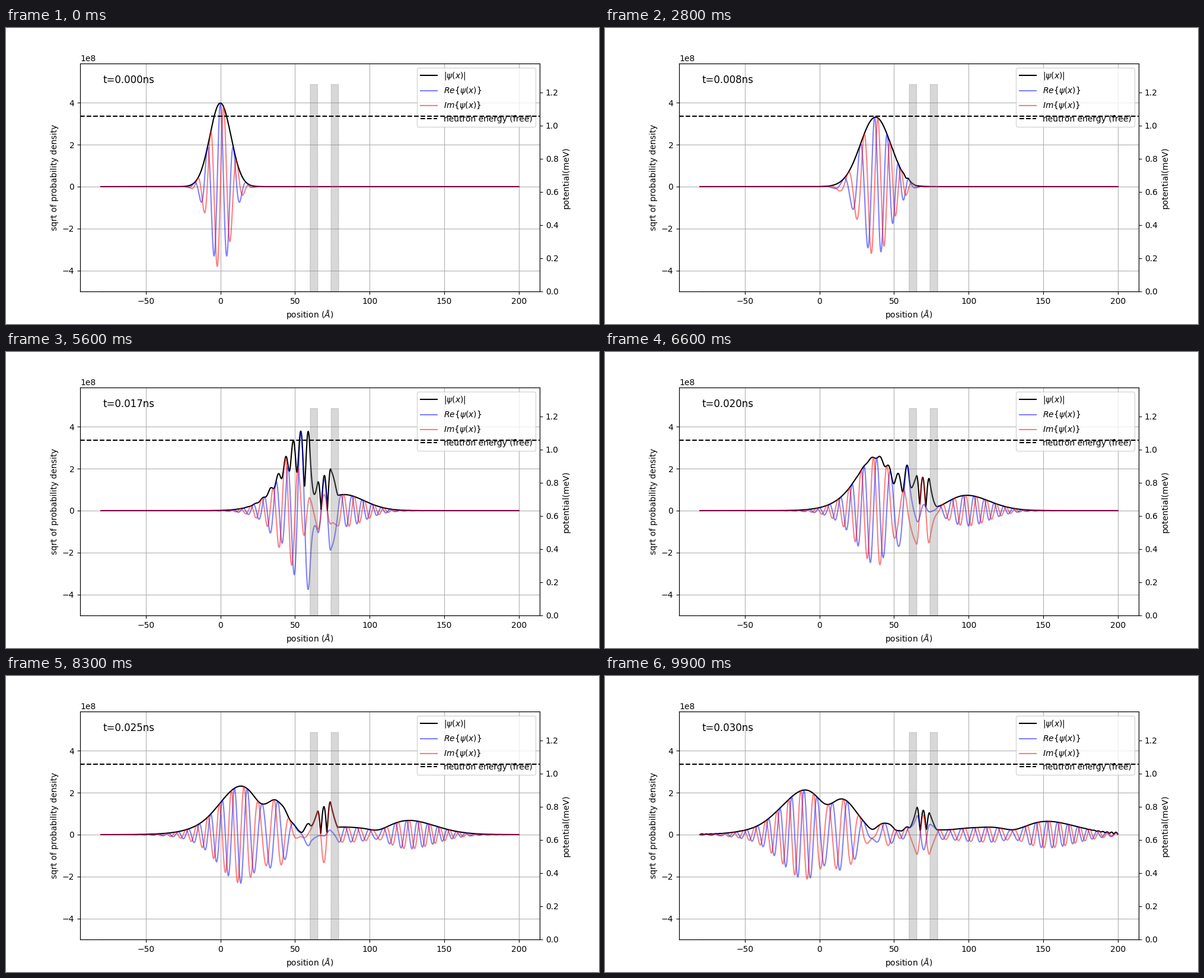
These frames come from a looping animation (1000 by 500 pixels, 10000 ms). A matplotlib script:

```python
import numpy as np
import matplotlib.pyplot as plt
from matplotlib.animation import FuncAnimation

# Units: angstrom, picosecond, meV
HBAR = 0.658212          # meV ps
KIN = 2.07212            # hbar^2 / 2m for a neutron, meV A^2
K0 = 0.7144              # mean wave number, 1/A
SIGMA = 10.0
V_MAX = 1.25
FRAMES, STEP = 100, 0.3  # step in ps

x = np.linspace(-80, 200, 1400)
dx = x[1] - x[0]


def inside(a, b):
    return (x >= a) & (x <= b)


potential = np.where(inside(60, 65) | inside(74, 79), V_MAX, 0.0)


def evolve():
    """Wave function at every time step, one column per frame."""
    hop = KIN / dx**2
    off = np.full(x.size - 1, -hop)
    ham = np.diag(potential + 2 * hop) + np.diag(off, 1) + np.diag(off, -1)
    energy, modes = np.linalg.eigh(ham)
    start = np.exp(-(x / SIGMA) ** 2 + 1j * K0 * x)
    start *= 1e10 / (SIGMA * np.sqrt(2 * np.pi))
    coef = modes.T @ start
    times = STEP * np.arange(FRAMES)
    phases = np.exp(-1j * np.outer(energy, times) / HBAR)
    return modes @ (coef[:, None] * phases)


psi = evolve()

fig, ax = plt.subplots(figsize=(10, 5), dpi=100)
mod_line, = ax.plot(x, np.abs(psi[:, 0]), "k", label=r"$|\psi(x)|$")
re_line, = ax.plot(x, psi[:, 0].real, "b", alpha=0.5, label=r"$Re\{\psi(x)\}$")
im_line, = ax.plot(x, psi[:, 0].imag, "r", alpha=0.5, label=r"$Im\{\psi(x)\}$")
clock = ax.text(0.05, 0.95, "", transform=ax.transAxes, fontsize=12, va="top")
ax.set_xlim(-94, 214)
ax.set_ylim(-5e8, 5.875e8)
ax.set_xlabel(r"position ($\AA$)")
ax.set_ylabel("sqrt of probability density")
ax.grid()

right = ax.twinx()
right.fill_between(x, potential, color="gray", alpha=0.3)
level = right.axhline(KIN * K0**2, color="k", ls="--",
                      label="neutron energy (free)")
right.set_xlim(-94, 214)
right.set_ylim(0, 1.1 * V_MAX)
right.set_ylabel("potential(meV)")
ax.legend(handles=[mod_line, re_line, im_line, level], loc="upper right")


def update(i):
    wave = psi[:, i]
    mod_line.set_ydata(np.abs(wave))
    re_line.set_ydata(wave.real)
    im_line.set_ydata(wave.imag)
    # just under 0.0003 ns per step so that halves round down
    clock.set_text(f"t={i * 0.0002999999:.3f}ns")
    return mod_line, re_line, im_line, clock


anim = FuncAnimation(fig, update, frames=FRAMES, interval=100,
                     repeat=True, repeat_delay=0, blit=False)
plt.show()
```
